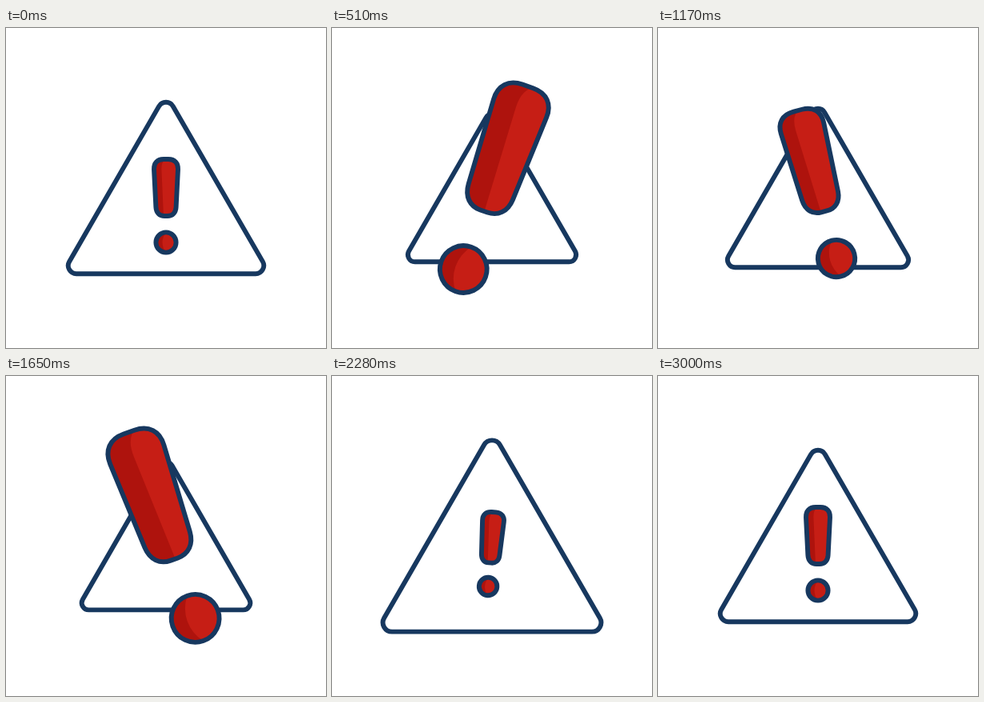
An HTML page that plays this animation: 400 px wide and 400 px high, repeating every 3.03 s.

```html
<!DOCTYPE html>
<html lang="en">
<head>
<meta charset="utf-8">
<title>Warning sign</title>
<style>
  html, body { margin: 0; width: 100%; height: 100%; overflow: hidden; background: #fff; }
  svg { display: block; width: 100vw; height: 100vh; }
  .line { fill: none; stroke: #17385f; }
  .dark { fill: #ae130d; }
  .light { fill: #c61e15; }
</style>
</head>
<body>
<svg viewBox="0 0 400 400">
  <defs>
    <path id="bar" d="M-3-58H3C11-58 15.4-53 15-45.5L12.6 2C12.2 9 8 13 2 13H-2C-8 13-12.2 9-12.6 2L-15-45.5C-15.4-53-11-58-3-58Z"/>
    <circle id="dot" cy="46" r="12.6"/>
    <clipPath id="barClip"><use href="#bar"/></clipPath>
    <clipPath id="dotClip"><use href="#dot"/></clipPath>
  </defs>
  <g transform="translate(200 200)">
    <path id="triangle" class="line"/>
    <g id="mark">
      <use href="#bar" class="dark"/>
      <g clip-path="url(#barClip)">
        <path id="shine" class="light" d="M1-59Q-6-56-5.6-45L-3 14H20V-59Z"/>
      </g>
      <use href="#bar" class="line"/>
      <use href="#dot" class="dark"/>
      <path class="light" clip-path="url(#dotClip)" d="M0 33.4A20 20 0 0 0 0 58.6H14V33.4Z"/>
      <use href="#dot" class="line"/>
    </g>
  </g>
</svg>
<script>
const LOOP = 3030, STEP = 30, LINE = 5.9;
const triangle = document.getElementById('triangle');
const mark = document.getElementById('mark');
const shine = document.getElementById('shine');

// Eases from 0 to 1 between two times.
function ramp(t, from, to) {
  const u = Math.min(1, Math.max(0, (t - from) / (to - from)));
  return (1 - Math.cos(Math.PI * u)) / 2;
}

// Rises to 1 at the peak and falls back to 0.
const bump = (t, from, peak, to) => ramp(t, from, peak) - ramp(t, peak, to);

// Equilateral triangle with rounded corners.
function trianglePath(r = 10.2) {
  const corners = [[0, -97], [112, 97], [-112, 97]];
  const normals = [[-.866, -.5], [.866, -.5], [0, 1]];
  const point = (c, n) => `${c[0] + n[0] * r} ${c[1] + n[1] * r}`;
  return corners.map((c, i) =>
    `${i ? 'L' : 'M'}${point(c, normals[i])}A${r} ${r} 0 0 1 ${point(c, normals[(i + 1) % 3])}`
  ).join('') + 'Z';
}

// Scales an element while its lines keep their width.
function place(element, scale, before = '') {
  element.setAttribute('transform', `${before} scale(${scale})`);
  element.setAttribute('stroke-width', LINE / scale);
}

function draw(t) {
  const swell = ramp(t, 0, 435);
  const back = ramp(t, 1600, 2210);
  const settle = ramp(t, 2210, 2700);

  const size = 1 - .143 * swell + .086 * bump(t, 440, 985, 1600) + .265 * back - .122 * settle;
  const zoom = 1 + 1.4 * swell - 1.1 * bump(t, 430, 927, 1420) - 1.51 * back + .11 * settle;
  const turn = 19.4 * swell - 39.4 * ramp(t, 570, 1360) + 24.7 * back - 4.7 * settle;
  const drop = Math.min(22, 22 - 25.5 * Math.log(zoom));

  place(triangle, size);
  place(mark, zoom, `rotate(${turn}) translate(0 ${drop})`);
  // The shaded side widens as the mark swells.
  shine.setAttribute('transform', `translate(${1.4 * Math.max(0, zoom - 1) ** 3} 0)`);
}

triangle.setAttribute('d', trianglePath());
draw(0);
const start = performance.now();
function tick() {
  const t = (performance.now() - start) % LOOP;
  draw(Math.floor(t / STEP) * STEP);
  requestAnimationFrame(tick);
}
requestAnimationFrame(tick);
</script>
</body>
</html>
```
